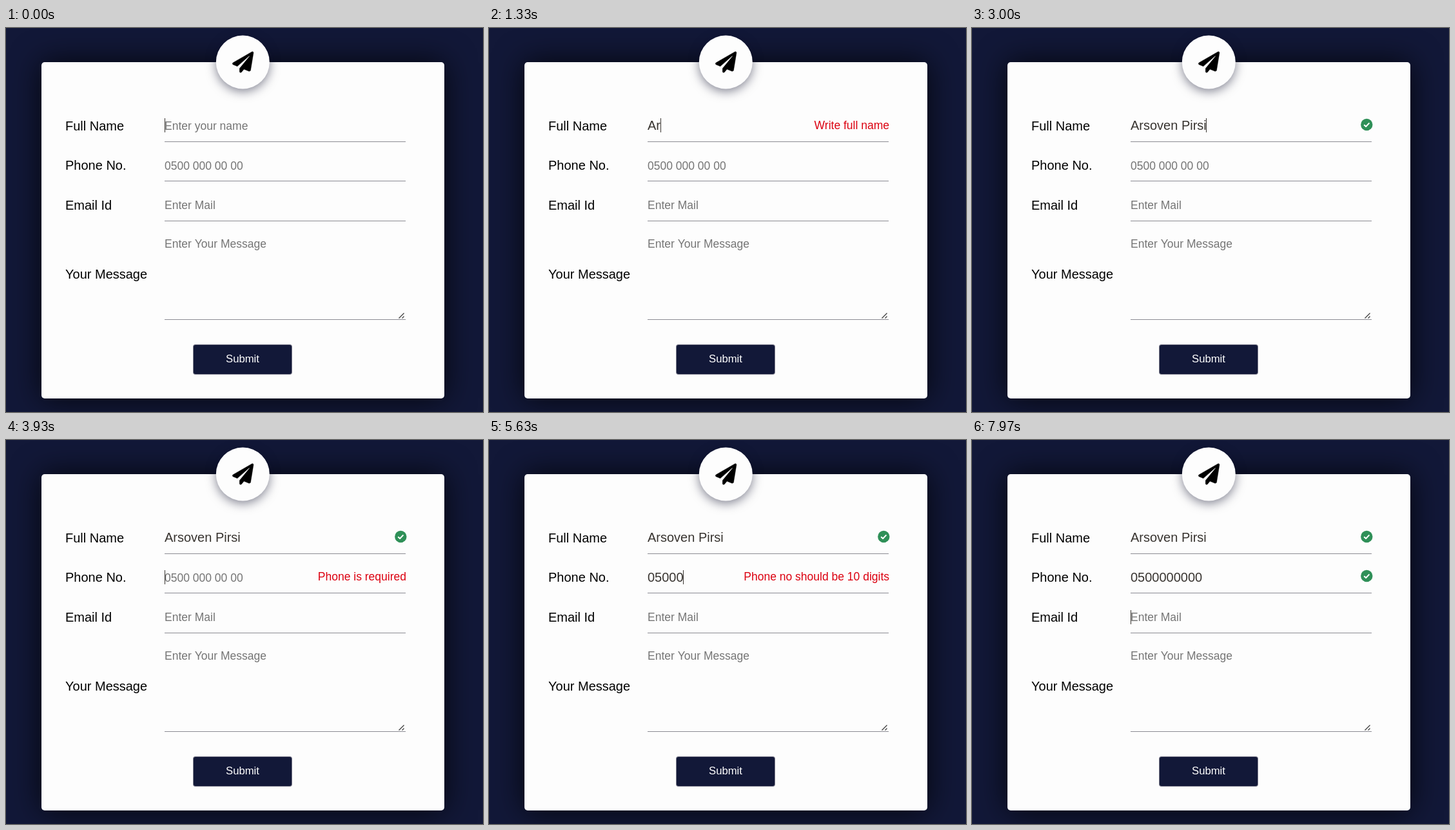
Recreate the animation shown at these times as an HTML page with a canvas. Size 740 by 596 pixels, loop 8000 ms.

```html
<!DOCTYPE html>
<html lang="en">
<head>
<meta charset="utf-8">
<title>Contact form</title>
<style>
  html, body { margin: 0; width: 100%; height: 100%; overflow: hidden; background: #121838; }
  canvas { display: block; }
</style>
</head>
<body>
<canvas id="stage" width="740" height="596"></canvas>
<script>
const ctx = document.getElementById('stage').getContext('2d');
const LOOP = 8000;
const BLINK = 500;
const FONT = '"Liberation Sans", Arial, sans-serif';
const SMALL = 17.5;
const LEFT = 246, RIGHT = 620;
const INK = '#383430', HINT = '#757575', RULE = '#8b8b93', CARD = '#fdfdfd', NAVY = '#121838';

// Key press times in ms, one per character.
const NAME = {
  text: 'Arsoven Pirsi',
  keys: [1030, 1200, 1400, 1500, 1700, 1870, 2000, 2300, 2470, 2600, 2730, 2870, 3000]
};
const PHONE = {
  text: '0500000000',
  keys: [4370, 4570, 4970, 5230, 5500, 5770, 6030, 6300, 6730, 6970]
};
const PHONE_FOCUS = 3570, PHONE_TOUCHED = 3670, MAIL_FOCUS = 7870;

const typed = (field, t) => field.text.slice(0, field.keys.filter(k => k <= t).length);

function text(str, x, y, size, color, align = 'left') {
  ctx.font = `${size}px ${FONT}`;
  ctx.fillStyle = color;
  ctx.textAlign = align;
  ctx.fillText(str, x, y);
}

function box(x, y, w, h, r, color) {
  ctx.beginPath();
  ctx.roundRect(x, y, w, h, r);
  ctx.fillStyle = color;
  ctx.fill();
}

function disc(x, y, r, color) {
  ctx.beginPath();
  ctx.arc(x, y, r, 0, Math.PI * 2);
  ctx.fillStyle = color;
  ctx.fill();
}

function path(points, width, color) {
  ctx.beginPath();
  points.forEach(([x, y]) => ctx.lineTo(x, y));
  ctx.lineWidth = width;
  ctx.strokeStyle = color;
  ctx.lineJoin = 'round';
  ctx.stroke();
}

function withShadow(color, blur, dy, draw) {
  ctx.save();
  ctx.shadowColor = color;
  ctx.shadowBlur = blur;
  ctx.shadowOffsetY = dy;
  draw();
  ctx.restore();
}

function plane() {
  const outline = [[381.7, 36.8], [351.9, 53.9], [351.2, 55.4], [352, 56.7], [358.8, 59.6],
                   [377.3, 43.3], [377.9, 43.8], [362.3, 62.7], [362.3, 67.9], [363.2, 69.2],
                   [365, 68.9], [369.2, 64], [377.2, 67.3], [379.4, 66.2], [384, 38.3], [383.2, 36.8]];
  path([...outline, outline[0]], 0.4, '#000');
  ctx.fillStyle = '#000';
  ctx.fill();
}

function check(y) {
  disc(612.3, y, 9.2, '#2f9058');
  path([[608.2, y + .2], [611.1, y + 3], [616.4, y - 2.6]], 2, '#fff');
}

function backdrop() {
  ctx.fillStyle = NAVY;
  ctx.fillRect(0, 0, 740, 596);
  withShadow('rgba(0,0,0,.8)', 48, 0, () => box(55, 53, 625, 522, 5, CARD));
  withShadow('rgba(10,12,40,.5)', 16, 4, () => disc(367.3, 53, 41.5, CARD));
  plane();
}

function form() {
  text('Full Name', 92, 159, 20, '#000');
  text('Phone No.', 92, 220, 20, '#000');
  text('Email Id', 92, 282, 20, '#000');
  text('Your Message', 92, 389, 20, '#000');
  ctx.fillStyle = RULE;
  [176, 237, 299, 452].forEach(y => ctx.fillRect(LEFT, y, RIGHT - LEFT, 1));
  text('Enter Mail', LEFT, 281, SMALL, HINT);
  text('Enter Your Message', LEFT, 341, SMALL, HINT);
  path([[609.5, 450.5], [617.5, 442.5]], 1.2, '#404040');
  path([[614.5, 450.5], [617.5, 447.5]], 1.2, '#404040');
  box(290, 491, 154, 47, 4, '#7c7c8c');
  box(291, 492, 152, 45, 3, NAVY);
  text('Submit', 367, 519, 16.7, '#fff', 'center');
}

function value(str, hint, y) {
  if (str) text(str, LEFT, y, 20, INK);
  else text(hint, LEFT, y, SMALL, HINT);
}

function error(str, y) {
  text(str, 621, y, SMALL, '#dc0010', 'right');
}

function caret(str, baseline, since, t) {
  if (Math.floor((t - since) / BLINK) % 2) return;
  ctx.font = `20px ${FONT}`;
  ctx.fillStyle = INK;
  ctx.fillRect(Math.floor(LEFT + ctx.measureText(str).width), baseline - 18, 1, 22);
}

function draw(t) {
  const name = typed(NAME, t), phone = typed(PHONE, t);
  backdrop();
  form();

  value(name, 'Enter your name', 158);
  if (name.includes(' ')) check(150);
  else if (name) error('Write full name', 157);

  value(phone, '0500 000 00 00', 220);
  if (phone.length === 10) check(211);
  else if (phone) error('Phone no should be 10 digits', 218);
  else if (t >= PHONE_TOUCHED) error('Phone is required', 218);

  // The caret turns solid again after each key press.
  const since = Math.max(0, ...[...NAME.keys, PHONE_FOCUS, ...PHONE.keys, MAIL_FOCUS].filter(k => k <= t));
  if (t >= MAIL_FOCUS) caret('', 282, since, t);
  else if (t >= PHONE_FOCUS) caret(phone, 220, since, t);
  else caret(name, 158, since, t);
}

const start = performance.now();
function frame() {
  draw((performance.now() - start) % LOOP);
  requestAnimationFrame(frame);
}
frame();
</script>
</body>
</html>
```
